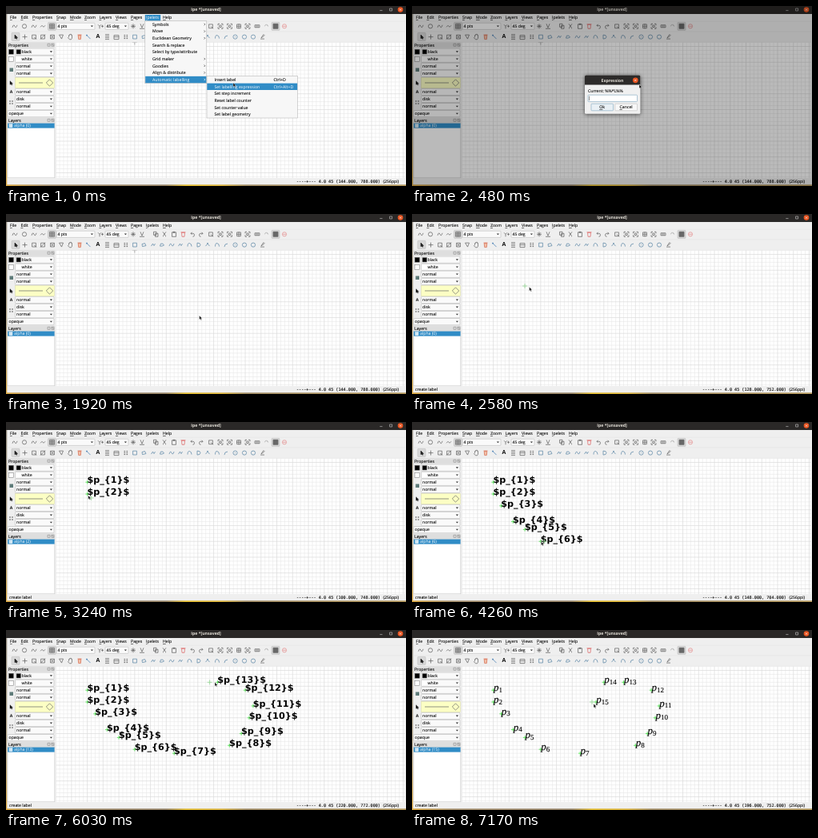
An HTML page that plays this animation: 500 by 225 pixels, repeating every 7.44 s.

```html
<!DOCTYPE html>
<html lang="en">
<head>
<meta charset="utf-8">
<title>Automatic labelling</title>
<style>
html, body { margin: 0; width: 100%; height: 100%; overflow: hidden; background: #efefef; }
svg { display: block; width: 500px; height: 225px; }
text { font: 5.2px "Open Sans", "Noto Sans", sans-serif; fill: #111; stroke: #111; stroke-width: .12px; white-space: pre; text-rendering: geometricPrecision; }
.bold { font-weight: 700; stroke: none; }
.white { fill: #fff; stroke: none; }
.title { fill: #e4e0d8; }
.mid { text-anchor: middle; }
.mono { font: 5.13px "DejaVu Sans Mono", monospace; }
.raw { font: bold 11.2px "DejaVu Sans", sans-serif; fill: #000; stroke: none; }
.math { font: italic 13px "Liberation Serif", serif; fill: #000; }
.sub { font: 9px "Liberation Serif", serif; }
.key { text-decoration: underline; }
.window { filter: drop-shadow(0 1px 2.5px rgba(0, 0, 0, .6)); }
</style>
</head>
<body>
<svg id="stage" viewBox="0 0 500 225" xmlns="http://www.w3.org/2000/svg">
  <defs>
    <linearGradient id="desk">
      <stop offset="0" stop-color="#d9a53c"/><stop offset=".1" stop-color="#a08a68"/>
      <stop offset=".4" stop-color="#8f7c60"/><stop offset=".45" stop-color="#e0b92c"/>
      <stop offset=".54" stop-color="#d8b03a"/><stop offset=".6" stop-color="#9a855f"/>
      <stop offset="1" stop-color="#b09458"/>
    </linearGradient>
    <linearGradient id="side" x2="0" y2="1">
      <stop offset="0" stop-color="#8c8578"/><stop offset=".7" stop-color="#b5a586"/>
      <stop offset="1" stop-color="#d9a53c"/>
    </linearGradient>
    <clipPath id="page"><rect x="62.5" y="45.5" width="436" height="169.5"/></clipPath>
  </defs>
</svg>
<script>
const LOOP = 7440, STEP = 30, CELL = 4.936, LEAD = 50;
const stage = document.getElementById('stage');
const BLUE = '#308cc6', INK = '#5c5c5c', LINE = '#bdbdbd';

function el(tag, attrs, parent = stage, text) {
  const e = document.createElementNS('http://www.w3.org/2000/svg', tag);
  for (const k in attrs) e.setAttribute(k, attrs[k]);
  if (text !== undefined) e.textContent = text;
  parent.appendChild(e);
  return e;
}
const group = (parent = stage, attrs = {}) => el('g', attrs, parent);
const rect = (x, y, w, h, fill, parent, more) => el('rect', { x, y, width: w, height: h, fill, ...more }, parent);
const path = (d, stroke, parent, more) => el('path', { d, fill: 'none', stroke, 'stroke-width': .7, ...more }, parent);
// y is the vertical middle of the line
const label = (x, y, s, cls = '', parent) => el('text', { x, y: y + 1.8, class: cls }, parent, s);
function keyed(x, y, s, cls, parent) {
  const t = label(x, y, '', cls, parent);
  el('tspan', { class: 'key' }, t, s[0]);
  el('tspan', {}, t, s.slice(1));
}
const show = (e, on) => e.setAttribute('visibility', on ? 'visible' : 'hidden');

function combo(x, y, w, s, tx = x + 1.5) {
  rect(x, y - 4.1, w, 8.2, '#fafafa', stage, { stroke: LINE, 'stroke-width': .6, rx: .8 });
  label(tx, y, s);
  path(`M${x + w - 5.2} ${y - .9}h3.2l-1.6 1.9z`, 'none', stage, { fill: '#333' });
}

function icons(y, list) {
  for (const [x, d, color = INK, fill = 'none'] of list)
    path(d, color, stage, { transform: `translate(${x} ${y})`, fill });
}

function drawFrame() {
  rect(0, 0, 500, 225, '#efefef');
  rect(0, 10, 1.3, 213.5, 'url(#side)');
  rect(0, 223.3, 500, 1.7, 'url(#desk)');
  rect(0, 0, 500, 10, '#2a2827');
  label(250, 4.6, 'Ipe *[unsaved]', 'bold title mid');
  path('M467.3 5.6h3.2M479.6 3h3v3h-3z', '#ccc', stage, { 'stroke-width': .6 });
  el('circle', { cx: 493, cy: 4.6, r: 3.3, fill: '#e95420' });
  path('M491.8 3.4l2.4 2.4m0-2.4l-2.4 2.4', '#fff', stage, { 'stroke-width': .6 });

  const bar = { File: 5, Edit: 18.5, Properties: 33, Snap: 63, Mode: 80, Zoom: 98, Layers: 116.5, Views: 137, Pages: 156, Ipelets: 175, Help: 196 };
  for (const s in bar) keyed(bar[s], 14.4, s);
  path('M1 19.2H499M1 32H499M1 45.2H499', '#dcdcdc', stage, { 'stroke-width': .5 });
}

function drawTools() {
  const box = 'M-2.4-2.4h4.8v4.8h-4.8z', ring = 'M-2.6 0a2.6 2.6 0 1 0 5.2 0a2.6 2.6 0 1 0-5.2 0';
  const grid = 'M-3-3h6v6h-6zM-1-3v6M1-3v6M-3-1h6M-3 1h6';
  const arc = 'M-2.5 2q0-4.5 2.5-4t2.5 4', wave = 'M-3 1.5q1.5-5 3-1.5t3-1.5', poly = 'M-2.5 1.5l2-3l1.5 2.5l1.5-2.5';
  const plus = 'M0-3v6M-3 0h6', cross = 'M-2-2l4 4m0-4l-4 4';
  const corner = 'M-3-3h2M1-3h2v2M3 1v2h-2M-1 3h-2v-2M-3-1v-2M-1.2-1.2h2.4v2.4h-2.4z';
  const hand = 'M-2 0v-2h1v-1h1v-.3h1v1h1v4l-1 1.5h-2l-2-2z', blue = '#5582a3', red = '#dc6060';
  for (const [x, y] of [[52.5, 20.4], [332, 20.4], [7, 33.4]])
    rect(x, y, 10, 10, '#d8d8d8', stage, { stroke: '#b4b4b4', 'stroke-width': .5, rx: 1 });
  icons(25.3, [
    [11, wave], [23, ring], [35, wave], [46, 'M-3 1l2-2l2 2l2-2'], [57.5, grid],
    [118, 'M-3-2l2 2l2-2M-1 0v3M1 0h3M2.5-1.5v3'], [159, plus + cross], [170, 'M-3 3h6M-2-3l2 5l2-5'],
    [187, 'M-2.5-3h3.5v4h-3.5zM-.5-1h3.5v4h-3.5z'], [198, 'M-2-3l3.5 5M2-3l-3.5 5M-2 2.5h1M1 2.5h1'],
    [210, 'M-2.5-2.5h5v5.5h-5zM-1-3h2v1h-2z'], [221.5, 'M-2-2h4l-.5 5h-3zM-3-2.5h6', red],
    [233, 'M-2-1h2.5q2 0 2 2t-2 2M-2-1l1.5-1.5M-2-1l1.5 1.5'], [244, 'M2-1h-2.5q-2 0-2 2t2 2M2-1l-1.5-1.5M2-1l-1.5 1.5'],
    [256, box + 'M0 0l3 3'], [268, corner], [279.5, corner], [291, box + plus], [302, corner],
    [314, 'M-3-1.5h6v3h-6zM-1-1.5v3M1-1.5v3'], [325.5, 'M-2 0q0-2 2-2t2 2M2 0l-1-1', '#aaa'],
    [337, grid, INK, '#777'], [348, ring + 'M-2 0h4', '#e48a8a']
  ]);
  combo(63, 25.3, 48, '4 pts');
  combo(124, 25.3, 29, '45 deg');
  label(112.6, 38.6, 'A', 'bold').style.fontSize = '7px';
  icons(38.6, [
    [12.5, 'M-1.5-2.5v4.6l1.2-1l.8 1.6l.7-.3l-.7-1.6h1.4z', '#222', '#222'], [23.5, plus], [35, box + 'M0 0l3 3'],
    [46, box + 'M-3 3l6-6'], [58, box + cross], [69, 'M-2.5-2.5h5l-2 5z'], [80.5, hand],
    [92, 'M-1.8-2h3.6l-.5 5h-2.6zM-2.5-2.6h5', '#d86a50', '#f0c0a8'], [103, 'M-1.5-1.5l4 4M-2.5-2.5h1v1h-1z', '#3a78b0'],
    [126.5, 'M-2.5-3h5M-2.5-1h5M-2.5 1h5M-2.5 3h5'], [138, 'M-3-2h6v5h-6zM-3 0h6'],
    [149.5, 'M-2-2h1.6M1-2h1.6M-2 0h1.6M1 0h1.6M-2 2h1.6M1 2h1.6', '#222'],
    [161, box, blue], [172.5, 'M-2 2l-.5-3l3.5-1l1.5 3z', blue], [184, poly, blue], [195, 'M-2.5 1.5l1-3h2.5l1.5 2l-2.5 1z', blue],
    [207, wave, blue], [218, poly, blue], [229.5, arc, blue], [241, 'M-2-2.5q4 0 4 2.5t-4 2.5z', blue],
    [252, 'M-2.5 1.5l2.5-3l2.5 3M-1-2h2', blue], [264, arc, blue], [275, 'M-2 2.5q0-4 4-4', blue],
    [286.5, ring + 'M-.4 0h.8', blue], [298, ring, blue], [309, ring, blue], [321, 'M-3 2.5h5M-2 1l3-4l1 1l-3 3z']
  ]);
}

let layerName;
function drawPanel() {
  for (const [s, y] of [['Properties', 48.7], ['Layers', 142.8]]) {
    rect(1.5, y - 3.3, 59.5, 6.8, '#dedede');
    label(3, y, s);
    path(`M52 ${y - 1.5}h3v3h-3zM57 ${y - 1.5}h3v3h-3zM57 ${y - 1.5}l3 3`, '#777', stage, { 'stroke-width': .5 });
  }
  const edge = { stroke: '#777', 'stroke-width': .5 };
  combo(11.5, 57.2, 48.5, 'black', 19.5);
  combo(11.5, 66.3, 48.5, 'white', 19.5);
  for (const [y, c] of [[57.2, '#000'], [66.3, '#fff']]) {
    rect(3.5, y - 3, 6, 6, c, stage, edge);
    rect(13, y - 2.7, 5.5, 5.5, c, stage, c === '#000' ? edge : {});
  }
  for (const [y, s] of [[75.3, 'normal'], [84.4, 'normal'], [107.4, 'normal'], [116.5, 'disk'], [125.6, 'normal']])
    combo(11.5, y, 48.5, s);
  combo(2, 134.6, 58, 'opaque');
  rect(11.5, 89.6, 49, 13, '#fcffc4', stage, { stroke: '#d8d8a8', 'stroke-width': .5 });
  path('M16 96H46M54.5 91.8l4.2 4.2l-4.2 4.2l-4.2-4.2z', '#666');
  path('M5 93.7v4.6l1.2-1l.8 1.6l.7-.3l-.7-1.6h1.4z', '#111', stage, { fill: '#111', 'stroke-width': .4 });
  rect(4.5, 77.5, 4.5, 4.5, '#5d7a78');
  label(4.8, 107.4, 'A', 'bold');
  for (const [x, y] of [[5, 119], [8, 119], [5, 122], [8, 122]]) rect(x - .6, y - .6, 1.2, 1.2, '#222');
  rect(2, 146.3, 58.8, 68.5, '#fff', stage, { stroke: '#c4c4c4', 'stroke-width': .5 });
  rect(2.2, 146.6, 58.4, 6, BLUE);
  rect(4, 147.6, 4, 4, '#cfe6f4', stage, { stroke: '#fff', 'stroke-width': .4 });
  layerName = label(10, 149.5, '', 'white');
}

// Grid coordinates are in points, four to a cell
const toX = x => 225 + (x - 196) / 4 * CELL;
const toY = y => 90 + (752 - y) / 4 * CELL;

function drawGrid(view) {
  rect(62.5, 45.5, 436, 169.5, '#fff', view);
  let thin = '', thick = '';
  for (let x = 64; x < 420; x += 4) {
    const d = `M${toX(x).toFixed(2)} 45V215`;
    x % 16 ? thin += d : thick += d;
  }
  for (let y = 648; y < 792; y += 4) {
    const d = `M62 ${toY(y).toFixed(2)}H499`;
    y % 16 ? thin += d : thick += d;
  }
  path(thin, '#e8e8e8', view, { 'stroke-width': .6 });
  path(thick, '#dcdcdc', view, { 'stroke-width': .7 });
}

// Time, x and y of each placed label
const marks = [
  [2880, 96, 764], [3210, 96, 752], [3480, 104, 740], [3750, 116, 724], [3990, 128, 716],
  [4255, 144, 704], [4650, 184, 700], [4890, 240, 708], [5100, 252, 720], [5270, 260, 736],
  [5490, 264, 748], [5730, 256, 764], [6000, 228, 772], [6210, 208, 772], [6420, 200, 752]
];

const route = [
  [0, 284, 96], [240, 284, 96], [480, 284, 98], [1410, 284, 98], [1800, 241.6, 127], [1950, 241.6, 127],
  [2130, 205, 112], [2190, 205, 112],
  ...marks.map(([t, x, y]) => [t, toX(x), toY(y)]),
  [6510, 227, 92.2], [LOOP, 227, 92.2]
];

function pointAt(t) {
  const i = Math.max(1, route.findIndex(p => p[0] > t));
  const [t0, x0, y0] = route[i - 1], [t1, x1, y1] = route[i];
  const k = Math.min(1, (t - t0) / (t1 - t0));
  return [x0 + (x1 - x0) * k, y0 + (y1 - y0) * k];
}

function drawMark([t, gx, gy], i, view) {
  const x = toX(gx), y = toY(gy), g = group(view);
  path(`M${x - 2.3} ${y}h4.6M${x} ${y - 2.3}v4.6`, '#35e035', g);
  const raw = el('text', { x: x - .2, y: y + 1, class: 'raw' }, g, `$p_{${i + 1}}$`);
  const math = el('text', { x: x + .4, y: y + 1, class: 'math' }, g, 'p');
  el('tspan', { class: 'sub', dy: 1.5 }, math, i + 1);
  return { t, g, raw, math };
}

function drawMenu() {
  const g = group(), edge = { stroke: '#aaa', 'stroke-width': .5 };
  rect(173.8, 11, 19.4, 7.6, BLUE, g);
  keyed(175, 14.4, 'Ipelets', 'white', g);
  const items = ['Symbols', 'Move', 'Euclidean Geometry', 'Search & replace', 'Select by type/attribute',
    'Grid maker', 'Goodies', 'Align & distribute', 'Automatic labelling'];
  rect(173.8, 18.8, 77, 78, '#f7f7f7', g, edge);
  items.forEach((s, i) => {
    const y = 23 + i * 8.63, on = i === 8;
    if (on) rect(174.2, y - 4.2, 76.2, 8.4, BLUE, g);
    label(183, y, s, on ? 'white' : '', g);
    if (i !== 3 && i !== 4) path(`M247.6 ${y - 1.2}l1.2 1.2l-1.2 1.2`, on ? '#fff' : '#333', g);
  });
  const sub = ['Insert label', 'Set labelling expression', 'Set step increment', 'Reset label counter',
    'Set counter value', 'Set label geometry'];
  rect(251, 87.6, 113.4, 52.4, '#f7f7f7', g, edge);
  sub.forEach((s, i) => {
    const y = 92.1 + i * 8.7, cls = i === 1 ? 'white' : '';
    if (cls) rect(251.3, y - 4.2, 112.8, 8.4, BLUE, g);
    label(260.5, y, s, cls, g);
    if (i < 2) label(334.5, y, ['Ctrl+D', 'Ctrl+Alt+D'][i], cls, g);
  });
  return g;
}

function drawDialog() {
  const g = group(stage, { class: 'window' }), rim = '#8fb0c6';
  rect(216, 86.5, 69.4, 48.3, '#f0f0f0', g, { rx: 1.5 });
  path('M216 98.6v-10.5q0-1.7 1.7-1.7h66q1.7 0 1.7 1.7v10.5z', 'none', g, { fill: '#2d2b2a' });
  label(250.5, 92.8, 'Expression', 'bold title mid', g);
  el('circle', { cx: 279.3, cy: 92.8, r: 3.4, fill: '#e95420' }, g);
  path('M278.1 91.6l2.4 2.4m0-2.4l-2.4 2.4', '#fff', g, { 'stroke-width': .6 });
  label(220, 106, 'Current: %%*L%%', '', g);
  rect(220, 111.2, 61.5, 8.4, '#fff', g, { stroke: rim, 'stroke-width': .7, rx: .8 });
  rect(224, 122.2, 27.5, 8.6, '#e9f0f5', g, { stroke: rim, 'stroke-width': .7, rx: .8 });
  rect(253.8, 122.2, 27.7, 8.6, '#f8f8f8', g, { stroke: LINE, 'stroke-width': .6, rx: .8 });
  keyed(237.7, 126.4, 'Ok', 'mid', g);
  keyed(267.6, 126.4, 'Cancel', 'mid', g);
  return g;
}

drawFrame();
drawTools();
drawPanel();
const view = group(stage, { 'clip-path': 'url(#page)' });
drawGrid(view);
const labels = marks.map((m, i) => drawMark(m, i, view));
const snap = path('M-3 0h6M0-3v6', '#999', view);
const hint = label(4, 219.3, 'create label');
const coords = label(363, 219.3, '', 'mono');
label(471.5, 219.3, '(256ppi)');
const menu = drawMenu();
const shade = rect(0, 0, 500, 225, '#000');
const dialog = drawDialog();
const entry = label(221.5, 115.5, '', '', dialog);
const caret = rect(221, 112.6, .5, 5.6, '#222', dialog);
const arrow = path('M0 0v5l1.2-1l.8 1.7l.9-.4l-.8-1.7h1.5z', '#fff', stage, { fill: '#111', 'stroke-width': .35 });
const FORMULA = '$p_{%%*N%%}$';

const clamp = k => Math.max(0, Math.min(1, k));

function render(time) {
  const t = Math.floor(time / STEP) * STEP;
  show(menu, t < 240);
  shade.setAttribute('opacity', .27 * Math.min(clamp((t - 300) / 150), clamp((1920 - t) / 120)));

  const open = t >= 330 && t < 1830;
  const typed = t < 660 ? 0 : Math.min(FORMULA.length, Math.floor((t - 660) / 60) + 1);
  show(dialog, open);
  entry.textContent = FORMULA.slice(0, typed);
  caret.setAttribute('x', 221 + (typed ? entry.getComputedTextLength() + .6 : 0));

  let count = 0;
  for (const m of labels) {
    const on = t >= m.t, set = t >= 7170;
    if (on) count++;
    show(m.g, on);
    show(m.raw, on && !set);
    show(m.math, on && set);
  }
  layerName.textContent = `alpha (${count})`;
  show(hint, t >= 2190);

  let gx = 144, gy = 788;
  if (t >= 1950) {
    const [x, y] = pointAt(Math.min(t + LEAD, LOOP - 1));
    gx = 196 + 4 * Math.round((x - 225) / CELL);
    gy = 752 - 4 * Math.round((y - 90) / CELL);
  }
  snap.setAttribute('transform', `translate(${toX(gx)} ${toY(gy)})`);
  snap.setAttribute('stroke', t < 2190 ? '#999' : '#86d086');
  coords.textContent = `----+--- 4.0 45 (${gx}.000, ${gy}.000)`;

  const [px, py] = pointAt(t);
  arrow.setAttribute('transform', `translate(${px} ${py})`);
  show(arrow, t < 5130 || t > 5220);
}

const start = performance.now();
function tick() {
  render((performance.now() - start) % LOOP);
  requestAnimationFrame(tick);
}
tick();
</script>
</body>
</html>
```
